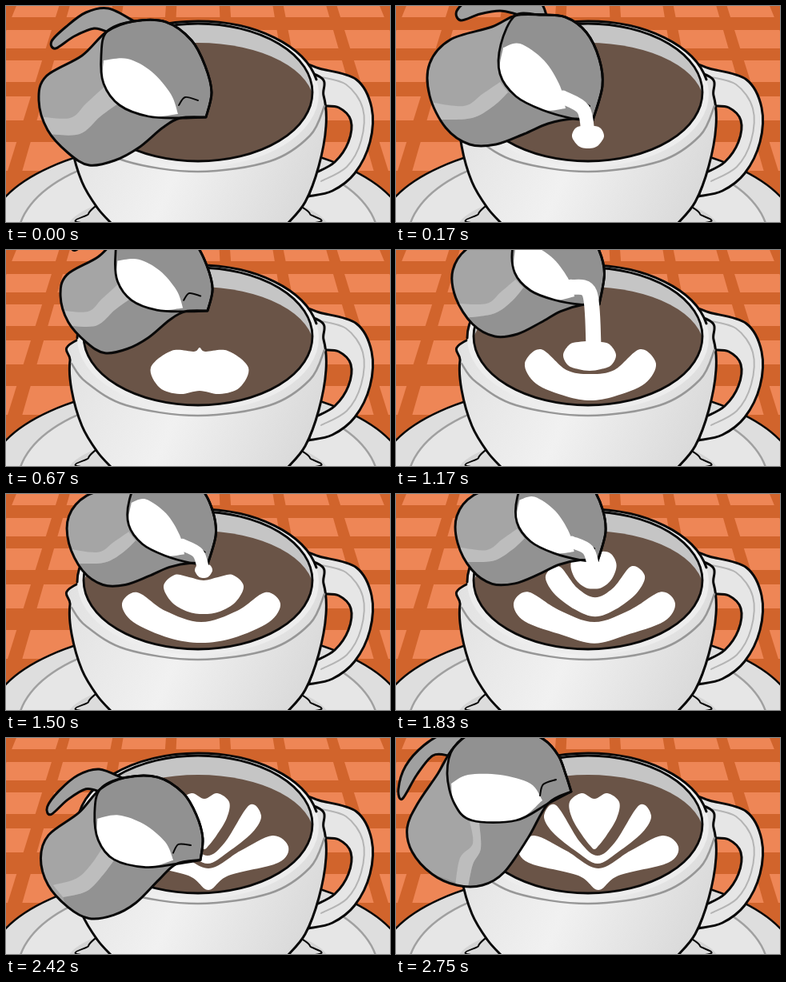
These frames come from a looping animation (480 px wide and 270 px high, 3010 ms). An HTML page with a canvas:

```html
<!DOCTYPE html>
<html lang="en">
<head>
<meta charset="utf-8">
<title>Latte art</title>
<style>
html, body { margin: 0; width: 100%; height: 100%; overflow: hidden; }
canvas { display: block; width: 480px; height: 270px; }
</style>
</head>
<body>
<canvas id="stage" width="480" height="270"></canvas>
<script>
const ctx = document.getElementById('stage').getContext('2d');
const LOOP = 3010, LAST = 33, INK = '#080808';
ctx.lineCap = ctx.lineJoin = 'round';

// Jug outlines: body 0-16 (11 is the spout tip), inner lip 17-20, milk surface 21-25,
// spout crease 26-28, handle 29-37, highlight edges 38-41 and 42-45.
const pairs = list => list.reduce((out, v, i) => (i % 2 ? out[out.length - 1].push(v) : out.push([v]), out), []);
const LEVEL = pairs([
  126,32, 95,62, 50,88, 41,118, 52,155, 78,184, 104,199, 136,193, 166,177, 196,152, 218,140, 250,139,
  257,108, 249,75, 232,43, 200,20, 160,19, 119,62, 122,97, 142,124, 178,138,
  122,68, 152,66, 182,82, 206,110, 215,135, 216,124, 224,114, 240,118,
  62,53, 57,44, 75,26, 100,8, 128,3, 160,19, 128,33, 110,28, 85,38,
  40,138, 80,140, 100,122, 124,100, 52,160, 92,160, 118,138, 140,122]);
const POUR = pairs([
  149,12, 120,26, 68,42, 42,72, 42,112, 62,152, 92,173, 125,173, 160,160, 190,147, 222,141, 246,143,
  258,100, 254,66, 238,33, 212,14, 180,11, 131,48, 130,85, 150,113, 183,130,
  134,52, 155,47, 185,68, 205,100, 212,128, 222,121, 232,120, 242,125,
  81,18, 76,6, 95,-8, 140,-14, 178,-6, 188,11, 150,10, 130,6, 105,10,
  42,120, 85,125, 108,110, 130,95, 55,142, 95,140, 122,125, 140,108]);
const UPRIGHT = pairs([
  72,12, 52,45, 27,82, 14,112, 20,142, 45,170, 76,184, 108,184, 135,168, 165,125, 190,82, 219,67,
  212,45, 203,22, 185,2, 150,-12, 100,-8, 64,45, 73,82, 95,103, 150,103,
  69,57, 90,46, 130,46, 168,57, 183,78, 180,72, 184,58, 200,52,
  8,76, 3,64, 12,35, 35,9, 62,-6, 90,-5, 66,22, 46,22, 26,46,
  74,186, 80,150, 96,132, 92,104, 90,186, 96,158, 106,138, 104,106]);

// step, tip x, tip y, scale, degrees, pour weight, upright weight
const POSES = [
  [0, 250, 139, 1, 0, 0, 0], [2, 246, 143, 1, 0, 1, 0], [6, 248, 108, .94, 0, .9, 0],
  [8, 252, 76, .88, 0, 0, 0], [10, 253, 72, .88, 0, 0, 0], [12, 254, 68, .87, -4, .9, 0],
  [14, 254, 68, .87, -6, 1, 0], [18, 252, 88, .85, 0, 1, 0], [22, 252, 84, .86, 0, .9, 0],
  [26, 253, 158, .91, 3, 0, 0], [27, 253, 180, .93, 2, 0, 0], [28, 249, 174, .95, 0, 0, .1],
  [33, 219, 67, 1, 0, 0, 1]];

// step, end x, end y, width
const STREAM = [
  [1, 238, 150, 0], [2, 240, 160, 17], [6, 241, 138, 14], [7, 241, 130, 0], [11, 244, 125, 0],
  [12, 245, 122, 17], [14, 247, 118, 19], [16, 247, 110, 8], [17, 247, 97, 15], [22, 247, 92, 15],
  [24, 248, 120, 12], [26, 247, 153, 10], [28, 250, 175, 0]];

// step, centre x, then (half width, y) down the right side of a symmetric shape
const BOTTOM_LEAF = [
  [2, 240, 0,150, 8,150, 16,153, 20,163, 14,173, 8,177, 0,178],
  [8, 242, 0,122, 7,127, 35,126, 61,147, 50,172, 25,180, 0,176],
  [14, 243, 0,155, 30,150, 62,124, 82,142, 68,167, 30,183, 0,188],
  [18, 244, 0,160, 45,146, 80,123, 99,137, 85,160, 40,180, 0,186],
  [24, 250, 0,160, 45,144, 85,122, 102,137, 88,159, 38,175, 0,187],
  [27, 253, 0,163, 40,141, 80,122, 100,136, 87,156, 25,172, 0,190]];
const MIDDLE_LEAF = [
  [12, 244, 0,120, 5,121, 12,124, 16,130, 13,137, 6,141, 0,142],
  [14, 242, 0,114, 14,115, 25,118, 33,131, 27,144, 14,149, 0,151],
  [18, 247, 0,108, 18,104, 36,101, 50,115, 40,135, 20,147, 0,150],
  [24, 250, 0,140, 25,124, 50,85, 68,96, 58,118, 28,143, 0,155],
  [27, 252, 0,147, 22,130, 52,84, 67,97, 56,118, 25,143, 0,157]];
const HEART = [
  [18, 247, 0,86, 5,87, 9,90, 11,95, 9,100, 5,104, 0,105],
  [23, 247, 0,72, 14,68, 26,72, 33,88, 26,108, 12,120, 0,122],
  [26, 248, 0,76, 16,69, 31,80, 28,100, 15,122, 4,136, 0,139]];

const mix = (a, b, k) => a + (b - a) * k;

function sample(keys, step) {
  if (step < keys[0][0]) return null;
  const n = keys.findIndex(key => key[0] > step);
  if (n < 0) return keys[keys.length - 1].slice(1);
  const a = keys[n - 1], b = keys[n], k = (step - a[0]) / (b[0] - a[0]);
  return a.map((v, i) => mix(v, b[i], k)).slice(1);
}

// Smooth curve through points; a point given twice makes a corner.
function curve(points, closed) {
  const path = new Path2D(), n = points.length;
  const get = i => points[closed ? (i + n) % n : Math.max(0, Math.min(n - 1, i))];
  path.moveTo(...points[0]);
  for (let i = 0; i < (closed ? n : n - 1); i++) {
    const [p, a, b, q] = [-1, 0, 1, 2].map(d => get(i + d));
    if (a[0] === b[0] && a[1] === b[1]) continue;
    path.bezierCurveTo(a[0] + (b[0] - p[0]) / 6, a[1] + (b[1] - p[1]) / 6,
      b[0] - (q[0] - a[0]) / 6, b[1] - (q[1] - a[1]) / 6, ...b);
  }
  if (closed) path.closePath();
  return path;
}

function paint(path, fill, stroke, width = 3) {
  if (fill) { ctx.fillStyle = fill; ctx.fill(path); }
  if (stroke) { ctx.strokeStyle = stroke; ctx.lineWidth = width; ctx.stroke(path); }
}

function oval(x, y, rx, ry) {
  const path = new Path2D();
  path.ellipse(x, y, rx, ry, 0, 0, 7);
  return path;
}

function clipped(path, draw) {
  ctx.save();
  ctx.clip(path);
  draw();
  ctx.restore();
}

function drawFloor() {
  ctx.fillStyle = '#d1642c';
  ctx.fillRect(0, 0, 480, 270);
  ctx.fillStyle = '#ee8656';
  const x = (col, y) => 240 + col * (66.8 + .12 * y);
  for (const [top, bottom] of [[-8, 14], [30, 53], [68, 95], [113, 143], [170, 206]])
    for (let col = -4; col <= 4; col++) {
      ctx.beginPath();
      ctx.moveTo(x(col - .4, top), top);
      ctx.lineTo(x(col + .4, top), top);
      ctx.lineTo(x(col + .4, bottom), bottom);
      ctx.lineTo(x(col - .4, bottom), bottom);
      ctx.fill();
    }
}

function drawCup() {
  paint(oval(240, 285, 262, 118), '#dedede', INK, 2.5);
  paint(oval(240, 290, 225, 113), '#e6e6e6', '#a0a0a0', 2.5);
  paint(oval(240, 282, 165, 52), '#d4d4d4');
  paint(curve(pairs([112,250, 103,260, 108,272, 372,272, 380,260, 368,250])), '#dcdcdc', INK, 2);

  const handle = pairs([372,76, 395,79, 438,92, 457,127, 455,170, 436,209, 408,231, 378,238, 378,238,
    388,208, 388,208, 411,195, 428,170, 431,143, 416,127, 396,125, 396,125]);
  paint(curve(handle, true), '#e6e6e6', INK);
  paint(curve(pairs([390,88, 425,98, 446,128, 444,168, 426,201, 394,219])), null, '#b4b4b4', 2);

  const shade = ctx.createLinearGradient(80, 130, 390, 270);
  shade.addColorStop(0, '#e2e2e2');
  shade.addColorStop(.45, '#f1f1f1');
  shade.addColorStop(1, '#d6d6d6');
  const bowl = pairs([90,112, 80,138, 82,175, 95,220, 114,252, 132,272, 132,272, 352,272, 352,272,
    374,245, 391,200, 400,150, 397,112, 382,84, 240,60]);
  paint(curve(bowl, true), shade, INK);
  paint(curve(pairs([82,142, 100,165, 150,194, 240,207, 330,194, 380,162, 398,125])), null, '#979797', 2.5);
  paint(oval(240, 110, 151, 91), '#ededed');
  const backRim = new Path2D();
  backRim.ellipse(240, 110, 151, 91, 0, Math.PI, -.2);
  paint(backRim, null, INK);
}

const opening = oval(240, 108, 143, 86);

function drawCoffee(step) {
  paint(opening, '#c5c5c5');
  clipped(opening, () => {
    paint(oval(240, 122, 145, 76), '#6a5447');
    for (const keys of [BOTTOM_LEAF, MIDDLE_LEAF, HEART]) {
      const shape = sample(keys, step);
      if (!shape) continue;
      const [centre, ...rest] = shape, half = pairs(rest);
      const right = half.map(([dx, y]) => [centre + dx, y]);
      const left = half.slice(1, -1).reverse().map(([dx, y]) => [centre - dx, y]);
      paint(curve([...right, ...left], true), '#fff');
    }
  });
  paint(opening, null, INK, 2.8);
}

function drawJug(step) {
  const [x, y, scale, degrees, pour, upright] = sample(POSES, step);
  const angle = degrees * Math.PI / 180, c = Math.cos(angle) * scale, s = Math.sin(angle) * scale;
  const shape = LEVEL.map((p, i) => p.map((v, k) =>
    v * (1 - pour - upright) + POUR[i][k] * pour + UPRIGHT[i][k] * upright));
  const tip = shape[11];
  const pts = shape.map(([px, py]) => {
    const dx = px - tip[0], dy = py - tip[1];
    return [x + dx * c - dy * s, y + dx * s + dy * c];
  });
  const line = (ids, closed) => curve(ids.map(i => pts[i]), closed);

  paint(line([29, 30, 31, 32, 33, 34, 34, 35, 35, 36, 37], true), '#a0a0a0', INK);
  const body = line([0, 1, 2, 3, 4, 5, 6, 7, 8, 9, 10, 11, 11, 12, 13, 14, 15, 16], true);
  paint(body, '#a5a5a5');
  clipped(body, () => {
    paint(line([42, 42, 43, 44, 45, 45, 10, 10, 9, 8, 7, 6, 5], true), '#929292');
    paint(line([38, 38, 39, 40, 41, 41, 45, 45, 44, 43, 42, 42], true), '#bdbdbd');
  });
  const mouth = line([0, 17, 18, 19, 20, 10, 11, 11, 12, 13, 14, 15, 16], true);
  paint(mouth, '#919191');
  clipped(mouth, () => paint(line([21, 21, 22, 23, 24, 25, 25, 20, 19, 18], true), '#fff'));
  paint(mouth, null, INK, 2.8);
  paint(body, null, INK);
  paint(line([26, 27, 28]), null, INK, 2);

  const stream = sample(STREAM, step);
  if (stream && stream[2] > 0) {
    const [endX, endY, width] = stream, [a, b] = [pts[24], pts[25]];
    const start = [(a[0] + b[0]) / 2, (a[1] + b[1]) / 2];
    paint(curve([start, [x - 12, y - 14], [endX, endY]]), null, '#fff', width);
  }
}

// Twelve drawings a second, on 10 ms ticks; the last one holds.
function frame(now) {
  const time = now % LOOP;
  let step = LAST;
  while (Math.round(step * 25 / 3) * 10 > time) step--;
  drawFloor();
  drawCup();
  drawCoffee(step);
  drawJug(step);
  requestAnimationFrame(frame);
}
requestAnimationFrame(frame);
</script>
</body>
</html>
```
